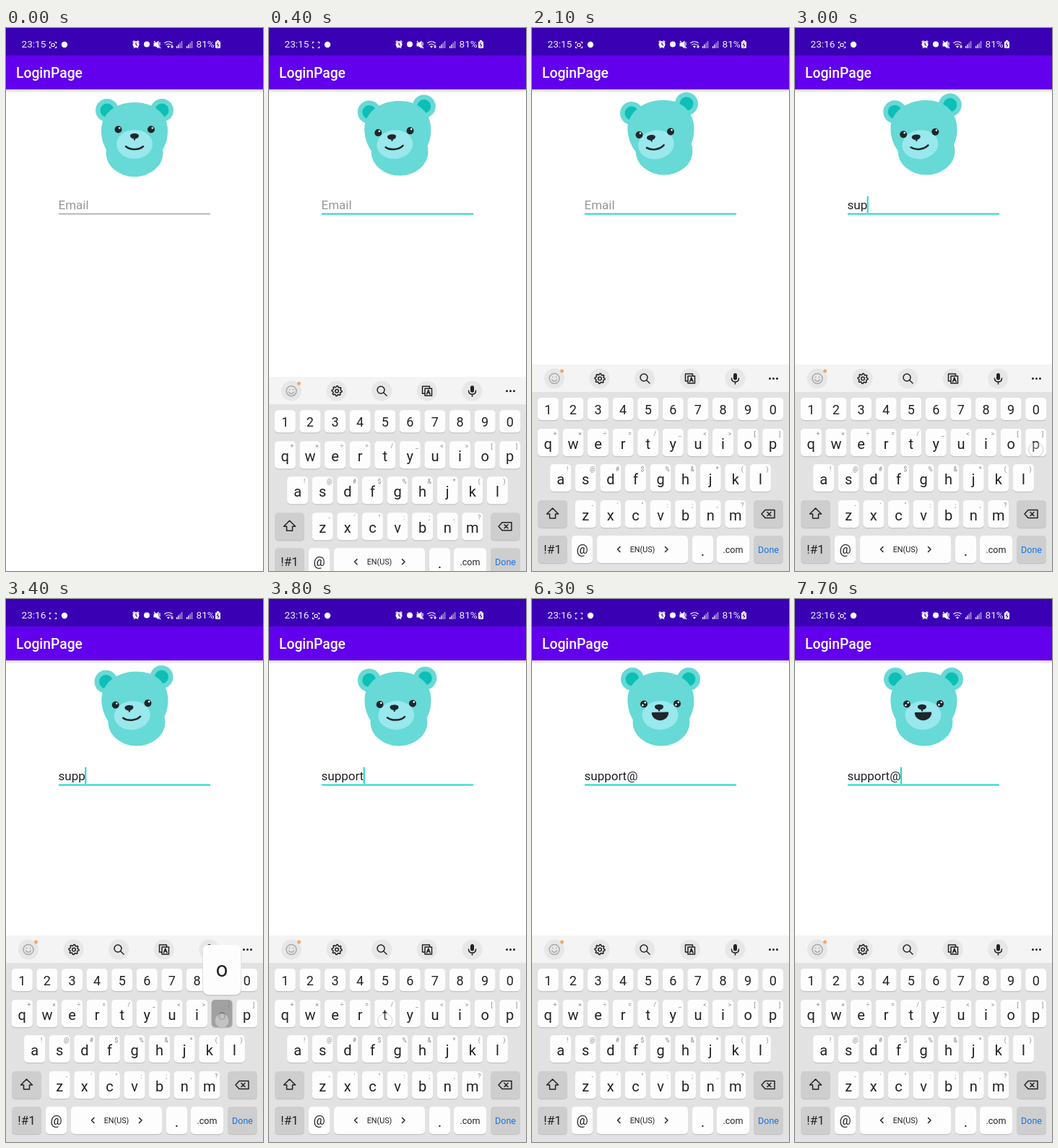
An HTML page that plays this animation: 356 by 752 pixels, repeating every 8000 ms.

```html
<!DOCTYPE html>
<html lang="en">
<head>
<meta charset="utf-8">
<title>LoginPage</title>
<style>
html, body { margin: 0; width: 100%; height: 100%; overflow: hidden; background: #fff; }
svg { display: block; width: 356px; height: 752px; font-family: Roboto, sans-serif; }
.mid { text-anchor: middle; }
.white { fill: #fff; }
.line { fill: none; stroke: #fff; stroke-width: 1.2; }
.ink { fill: none; stroke: #222; stroke-width: 1.5; stroke-linecap: round; stroke-linejoin: round; }
.fur { fill: #67d9d6; }
.ear { fill: #0dbfb5; }
.dark { fill: #20262a; }
</style>
</head>
<body>
<svg viewBox="0 0 356 752">
  <defs>
    <linearGradient id="shade" x2="0" y2="1">
      <stop stop-color="#000" stop-opacity=".16"/>
      <stop offset="1" stop-color="#000" stop-opacity="0"/>
    </linearGradient>
  </defs>
  <rect width="356" height="752" fill="#fff"/>
  <rect y="85" width="356" height="5" fill="url(#shade)"/>
  <rect y="37" width="356" height="48" fill="#6200ee"/>
  <rect width="356" height="38" fill="#3a00b3"/>
  <text x="14" y="69" font-size="19.3" font-weight="500" class="white">LoginPage</text>

  <!-- status bar -->
  <g font-size="13.6" fill="#f3efff">
    <text id="clock" x="21.5" y="27">23:15</text>
    <text x="263.5" y="27">81%</text>
  </g>
  <path class="line" d="M60.5 21.5v-2h2M67.5 19.5h2v2M69.5 25.500v2h-2M62.500 27.500h-2v-2"/>
  <rect id="rec" class="line" x="63" y="21.500" width="4" height="4" rx="1"/>
  <circle class="white" cx="81" cy="23" r="4.200"/>
  <circle class="white" cx="180" cy="22.700" r="4.500"/>
  <path class="line" d="M175.500 19.500l2.500-2M184.500 19.500l-2.500-2M177 28l1.500-2M183 28l-1.500-2"/>
  <path d="M180 20v3l2 1.200" fill="none" stroke="#3a00b3" stroke-width="1.200"/>
  <circle class="white" cx="195" cy="22.500" r="4"/>
  <path class="white" d="M204.500 20.500h3l4-3v11l-4-3h-3z"/>
  <path class="line" d="M205 18l9 10M213 19.500v5"/>
  <path class="line" d="M219.500 21q5.500-4.500 11 0M221.500 23.500q3.500-3 7 0"/>
  <path class="white" d="M223 25.300q2-1.500 4 0l-2 2.500z"/>
  <path id="wifi" class="line" d="M230 23v5M228 26h4"/>
  <g id="signals"></g>
  <rect class="white" x="290" y="18.500" width="7" height="9.500" rx="1.200"/>
  <rect class="white" x="292" y="17" width="3" height="2"/>
  <path d="M294 20l-2 3.500h3l-2 3.500" fill="none" stroke="#3a00b3"/>

  <!-- bear -->
  <g data-part="earL"><circle class="fur" r="16"/><circle class="ear" r="9.500"/></g>
  <g data-part="earR"><circle class="fur" r="16"/><circle class="ear" r="9.500"/></g>
  <ellipse data-part="body" class="fur" rx="39.500" ry="33"/>
  <path data-part="head" class="fur" d="M0-43C26-43 46-28 46-4C46 20 32 42 0 42C-32 42-46 20-46-4C-46-28-26-43 0-43Z"/>
  <ellipse data-part="muzzle" rx="25" ry="20" fill="#98e8ed"/>
  <g data-part="eyeL"><circle class="dark" r="5"/><circle class="white" cx="1.800" cy="-2" r="1.300"/><circle class="white spark" cx="-1.600" cy="1.600" r="1.300"/></g>
  <g data-part="eyeR"><circle class="dark" r="5"/><circle class="white" cx="1.800" cy="-2" r="1.300"/><circle class="white spark" cx="-1.600" cy="1.600" r="1.300"/></g>
  <path data-part="nose" class="dark" d="M-6-1C-6-5 6-5 6-1C6 2 3 3 1 3.500V5.500H-1V3.500C-3 3-6 2-6-1Z"/>
  <path data-part="mouth" id="mouth" class="dark" stroke="#20262a" stroke-width="2.500" stroke-linejoin="round"/>

  <!-- field -->
  <text id="hint" x="72.500" y="251" font-size="17" fill="#979797">Email</text>
  <text id="typed" x="72.500" y="251" font-size="17" fill="#202020"></text>
  <rect id="rule" x="73"  width="210"/>
  <rect id="caret" y="233" width="2" height="23" fill="#18d8cb"/>

  <!-- keyboard -->
  <g id="board">
    <rect y="466" width="356" height="286" fill="#f4f4f4"/>
    <rect y="504" width="356" height="248" fill="#e2e2e2"/>
    <g id="tools" fill="#e7e7e7"></g>
    <g class="ink" style="stroke:#aaa">
      <circle cx="31" cy="485.500" r="7"/>
      <path d="M27.500 487q3.500 4.500 7 0M28.500 483.300v.4M33.500 483.300v.4"/>
    </g>
    <circle cx="41.500" cy="475" r="2.500" fill="#f3a868"/>
    <path id="gear" class="ink"/>
    <circle class="ink" cx="94" cy="485.500" r="2.300"/>
    <circle class="ink" cx="155" cy="484" r="5"/>
    <path class="ink" d="M159 488l4 4"/>
    <path class="ink" d="M215 489h-2.500v-10h10v2.500M216 482h9.500v10h-9.500zM218.500 490l2.300-6 2.300 6M219.300 488h3"/>
    <rect x="279" y="478" width="5" height="9.500" rx="2.500" fill="#222"/>
    <path class="ink" d="M276.500 485q0 5 5 5t5-5M281.500 490v3"/>
    <path d="M329.500 485.500h0M334.500 485.500h0M339.500 485.500h0" stroke="#222" stroke-width="3" stroke-linecap="round"/>
    <g id="keys"></g>
    <path class="ink" d="M28.500 665l8 8h-4v6h-8v-6h-4z"/>
    <path class="ink" d="M323 667.500h13v11h-13l-5-5.500zM326 670.500l5 5M331 670.500l-5 5"/>
    <path class="ink" d="M122 718.500l-3.500 3.500 3.500 3.500M184.500 718.500l3.500 3.500-3.500 3.500"/>
    <rect id="press" width="29" height="38" rx="5" fill="#8b8b8b" opacity=".8"/>
  </g>
  <g id="bubble">
    <rect x="-27" y="1.500" width="54" height="69" rx="8" fill="#c9c9c9"/>
    <rect x="-26.500" width="53" height="69" rx="8" fill="#fdfdfd"/>
    <text class="mid" y="44" font-size="29" fill="#222"></text>
  </g>
  <circle id="touch" r="10" fill="#fff" fill-opacity=".45" stroke="#999" stroke-opacity=".7"/>
</svg>
<script>
const $ = id => document.getElementById(id);
const LOOP = 8000, PITCH = 34.6;

function add(parent, tag, attrs, text) {
  const node = document.createElementNS('http://www.w3.org/2000/svg', tag);
  for (const name in attrs) node.setAttribute(name, attrs[name]);
  if (text) node.textContent = text;
  return parent.appendChild(node);
}

const spots = {};
function key(label, cx, y, size, { w = 29, h = 38, fill = '#fdfdfd', color = '#222', base = 27, alt } = {}) {
  const box = { x: cx - w / 2, width: w, height: h, rx: 5 };
  add($('keys'), 'rect', { ...box, y: y + 1.2, fill: '#c3c3c3' });
  add($('keys'), 'rect', { ...box, y, fill });
  if (label) add($('keys'), 'text', { class: 'mid', x: cx, y: y + base, 'font-size': size, fill: color }, label);
  if (alt) add($('keys'), 'text', { class: 'mid', x: cx + 9.5, y: y + 10, 'font-size': 8.5, fill: '#888' }, alt);
  spots[label] = [cx, y];
}
function row(letters, x, y, size, alts = '', options = {}) {
  [...letters].forEach((c, i) => key(c, x + i * PITCH, y, size, { ...options, alt: alts[i] }));
}

row('1234567890', 22.3, 512, 18, '', { h: 31, base: 22.5 });
row('qwertyuiop', 22.3, 555, 20, '+×÷=/_<>[]', { base: 28 });
row('asdfghjkl', 39.6, 604, 20, '!@#$%&*()', { base: 28 });
row('zxcvbnm', 74.2, 654, 20, "-'\":;,?", { base: 27.5 });
const gray = { w: 41, fill: '#cecece' };
key('', 28.5, 654, 0, gray);
key('', 327.5, 654, 0, gray);
key('!#1', 28.5, 703, 17, { ...gray, base: 25 });
key('@', 69.5, 703, 18, { base: 25 });
key('EN(US)', 153, 703, 10.8, { w: 126, base: 23 });
key('.', 236.5, 703, 21, { base: 28 });
key('.com', 278.5, 703, 12.5, { w: 45, base: 23.5 });
key('Done', 327.5, 703, 12.5, { ...gray, color: '#1673e6', base: 23.5 });

for (let i = 0; i < 5; i++) add($('tools'), 'circle', { cx: 31 + i * 62.6, cy: 485.5, r: 14 });
for (const x of [236, 250])
  for (let i = 0; i < 4; i++)
    add($('signals'), 'rect', { x: x + i * 2.3, y: 25 - i * 2.3, width: 1.3, height: 3 + i * 2.3, fill: '#fff', opacity: i < 2 ? 1 : .65 });

let gear = '';
for (let i = 0; i < 32; i++) {
  const a = i * Math.PI / 16, r = i % 4 < 2 ? 7 : 5.4;
  gear += (i ? 'L' : 'M') + (94 + r * Math.cos(a)).toFixed(2) + ' ' + (485.5 + r * Math.sin(a)).toFixed(2);
}
$('gear').setAttribute('d', gear + 'Z');

// x, y for: facing front, looking at an empty field, looking at eight letters
const poses = {
  earL: [140, 114, 138, 118, 139, 111],
  earR: [216, 114, 214, 105, 217, 111],
  body: [178, 173, 183, 170.5, 179, 170.5],
  head: [178, 146, 179, 143, 178.5, 144],
  muzzle: [178, 161, 172, 161.5, 177.5, 161],
  eyeL: [155.5, 140.5, 148.5, 148, 155, 145.5],
  eyeR: [201, 140.5, 192, 143.5, 201, 145],
  nose: [178, 150, 165, 152, 176, 150],
  mouth: [178, 165.5, 171, 165.5, 177.5, 165]
};
const tilts = [0, -9, -1];
const parts = [...document.querySelectorAll('[data-part]')];
const sparks = [...document.querySelectorAll('.spark')];

// release time, letter, press length
const taps = [
  [2500, 's', 120], [2750, 'u', 120], [2980, 'p', 120], [3230, 'p', 120],
  [3430, 'o', 120], [3600, 'r', 120], [3750, 't', 120], [5490, '@', 260]
];
const caretFlips = [520, 1150, 1600, 2100, 2490, 4250, 4760, 5260, 5490, 5990, 6490, 6990, 7490];

const lerp = (a, b, k) => a + (b - a) * k;
const ramp = (t, from, length) => Math.min(1, Math.max(0, (t - from) / length));
const smooth = k => k * k * (3 - 2 * k);
const show = (node, on) => node.setAttribute('visibility', on ? 'visible' : 'hidden');
const move = (node, x, y, turn = 0) => node.setAttribute('transform', `translate(${x} ${y}) rotate(${turn})`);

function drawBear(t) {
  const look = smooth(ramp(t, 200, 350));
  const read = taps.reduce((sum, tap) => sum + smooth(ramp(t, tap[0], 180)), 0) / 8;
  const blend = (a, b, c) => lerp(a, lerp(b, c, read), look);
  const joy = smooth(ramp(t, 5500, 250));
  const tilt = blend(...tilts);
  for (const part of parts) {
    const name = part.dataset.part, p = poses[name];
    const lift = name === 'mouth' ? joy * -3.5 : 0;
    move(part, blend(p[0], p[2], p[4]), blend(p[1], p[3], p[5]) + lift, name === 'body' ? 0 : tilt);
  }
  const w = lerp(12, 10.5, joy), y = lerp(-1.5, -3.5, joy);
  const top = lerp(3.8, -3.5, joy), low = lerp(3.8, 8.5, joy);
  $('mouth').setAttribute('d', `M${-w} ${y}C-6 ${top} 6 ${top} ${w} ${y}C${lerp(6, 9, joy)} ${low} ${-lerp(6, 9, joy)} ${low} ${-w} ${y}Z`);
  for (const spark of sparks) spark.setAttribute('opacity', joy);
}

function drawField(t) {
  const focus = t >= 200;
  const text = taps.filter(tap => t >= tap[0]).map(tap => tap[1]).join('');
  $('typed').textContent = text;
  show($('hint'), !text);
  $('rule').setAttribute('y', focus ? 256.5 : 257);
  $('rule').setAttribute('height', focus ? 2 : 1);
  $('rule').setAttribute('fill', focus ? '#18d8cb' : '#858585');
  $('caret').setAttribute('x', 72.5 + (text ? $('typed').getComputedTextLength() - .5 : 0));
  show($('caret'), caretFlips.filter(flip => t >= flip).length % 2);
}

function drawTouch(t) {
  const held = taps.find(([end, , length]) => t >= end - length && t < end);
  const recent = held || taps.filter(tap => t >= tap[0]).pop();
  show($('press'), held);
  show($('bubble'), held);
  if (held) {
    const [x, y] = spots[held[1]];
    $('press').setAttribute('x', x - 14.5);
    $('press').setAttribute('y', y);
    move($('bubble'), x, y - 76);
    $('bubble').lastElementChild.textContent = held[1];
  }
  const fade = held ? 1 : recent ? 1 - ramp(t, recent[0], 200) : 0;
  $('touch').setAttribute('opacity', fade * .8);
  if (recent) {
    const [x, y] = spots[recent[1]];
    move($('touch'), x + (recent[1] === '@' ? 1 : 0), y + (recent[1] === '@' ? 20 : 29));
  }
}

function draw(t) {
  $('clock').textContent = t < 2600 ? '23:15' : '23:16';
  show($('rec'), (t + 800) % 1000 >= 500);
  show($('wifi'), t < 6250);
  const slide = 1 - ramp(t, 200, 330);
  move($('board'), 0, 288 * slide ** 3);
  drawBear(t);
  drawField(t);
  drawTouch(t);
}

const start = performance.now();
function tick() {
  draw((performance.now() - start) % LOOP);
  requestAnimationFrame(tick);
}
tick();
</script>
</body>
</html>
```
